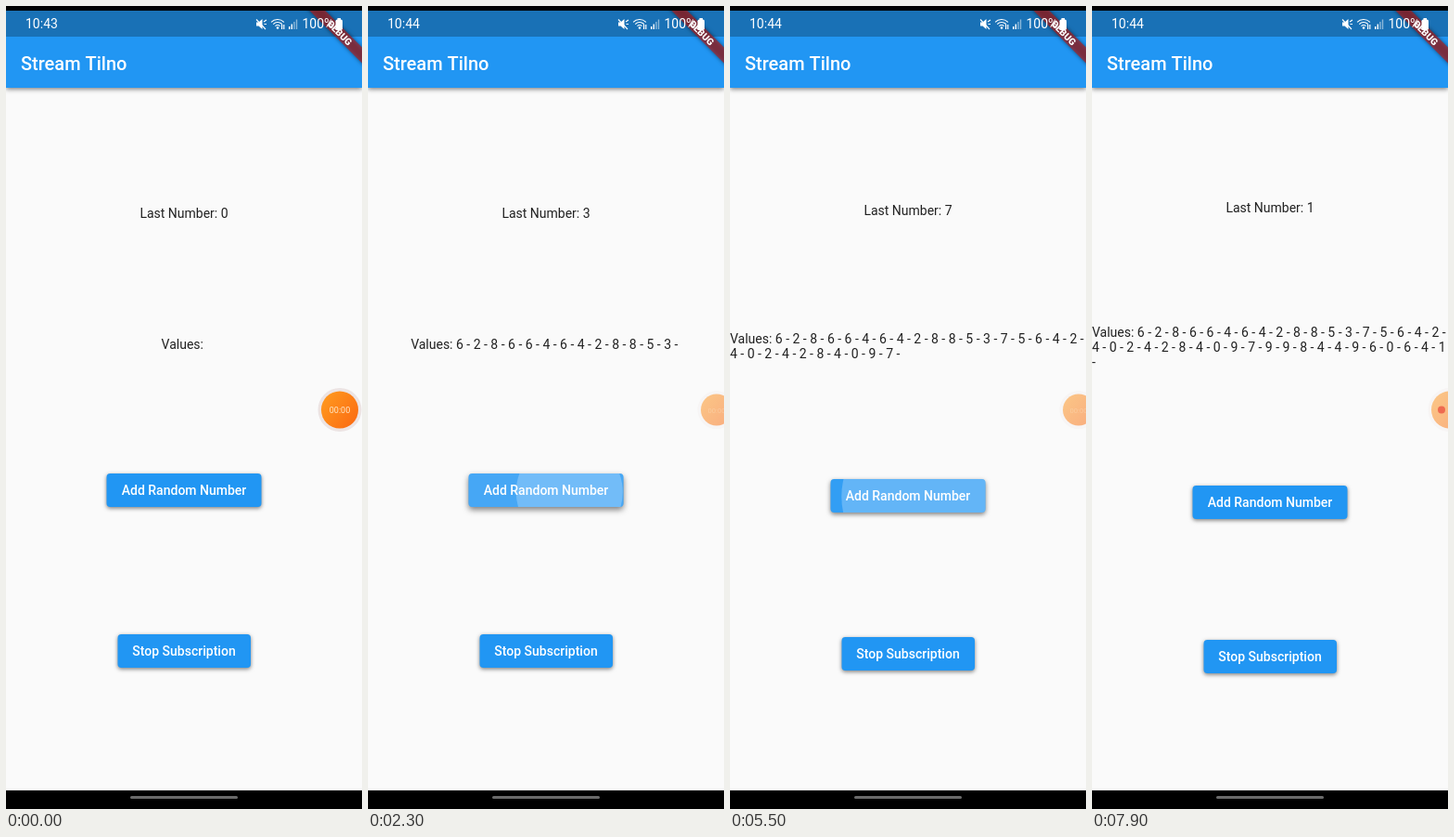
Animation, 384 px wide and 864 px high, one loop 8000 ms. Source, as an HTML page with a canvas:

```html
<!DOCTYPE html>
<html lang="en">
<head>
<meta charset="utf-8">
<title>Stream Tilno</title>
<style>
  html, body { margin: 0; width: 100%; height: 100%; overflow: hidden; background: #fafafa; }
  canvas { display: block; width: 384px; height: 864px; }
</style>
</head>
<body>
<canvas id="stage"></canvas>
<script>
const W = 384, H = 864, LOOP = 8000, STEP = 100;
const BLUE = '#2196f3', INK = '#212121';
const FONT = 'Roboto, "Liberation Sans", sans-serif';

const VALUES = '628664642885375642402428409799844960641';
// [count, time in ms]; taps between these are evenly spaced
const TAPS = [[1, 80], [6, 810], [13, 2220], [18, 3250], [23, 4380], [34, 6450], [39, 7440]];

const canvas = document.getElementById('stage');
const ctx = canvas.getContext('2d');
const dpr = window.devicePixelRatio || 1;
canvas.width = W * dpr;
canvas.height = H * dpr;

const clamp = (v, a = 0, b = 1) => Math.min(b, Math.max(a, v));
const lerp = (a, b, p) => a + (b - a) * p;
const smooth = (t, from, to) => {
  const p = clamp((t - from) / (to - from));
  return p * p * (3 - 2 * p);
};

const tapTimes = [];
TAPS.slice(1).forEach(([n1, t1], i) => {
  const [n0, t0] = TAPS[i];
  for (let n = n0; n < n1; n++) tapTimes.push(lerp(t0, t1, (n - n0) / (n1 - n0)));
});
tapTimes.push(TAPS[TAPS.length - 1][1]);

function rect(x, y, w, h, color) {
  ctx.fillStyle = color;
  ctx.fillRect(x, y, w, h);
}

function round(x, y, w, h, r) {
  ctx.beginPath();
  ctx.roundRect(x, y, w, h, r);
}

function disc(x, y, r, color) {
  ctx.fillStyle = color;
  ctx.beginPath();
  ctx.arc(x, y, r, 0, Math.PI * 2);
  ctx.fill();
}

function text(str, x, y, { size = 14, weight = 400, color = '#fff', align = 'left' } = {}) {
  ctx.font = `${weight} ${size}px ${FONT}`;
  ctx.fillStyle = color;
  ctx.textAlign = align;
  ctx.fillText(str, x, y);
}

function shadow(color, blur, dy) {
  ctx.shadowColor = color;
  ctx.shadowBlur = blur * dpr;
  ctx.shadowOffsetY = dy * dpr;
}

function wrap(str) {
  ctx.font = `400 14px ${FONT}`;
  const lines = [];
  let line = '';
  for (const word of str.trim().split(' ')) {
    const next = line ? line + ' ' + word : word;
    if (line && ctx.measureText(next).width > W) {
      lines.push(line);
      line = word;
    } else line = next;
  }
  return [...lines, line];
}

function drawBar() {
  ctx.save();
  shadow('rgba(0,0,0,.5)', 5, 1.5);
  rect(0, 5, W, 83, BLUE);
  ctx.restore();
  rect(0, 5, W, 28, 'rgba(0,0,0,.25)');
  text('Stream Tilno', 16, 69, { size: 20, weight: 500 });
}

function drawBanner() {
  ctx.save();
  ctx.beginPath();
  ctx.rect(0, 5, W, H);
  ctx.clip();
  ctx.translate(W, 5);
  ctx.rotate(Math.PI / 4);
  ctx.filter = `blur(${2 * dpr}px)`;
  rect(-50, 28, 100, 12, 'rgba(0,0,0,.5)');
  ctx.filter = 'none';
  rect(-50, 28, 100, 12, 'rgba(183,28,28,.63)');
  text('DEBUG', 0, 37.6, { size: 10.2, weight: 900, align: 'center' });
  ctx.restore();
}

function drawStatus(clock, alpha) {
  ctx.save();
  ctx.globalAlpha = alpha;
  text(clock, 21, 24);
  text('100%', 319.5, 24);
  ctx.fillStyle = ctx.strokeStyle = '#fff';

  // muted speaker
  ctx.beginPath();
  ctx.moveTo(270, 17.5);
  ctx.lineTo(272.5, 17.5);
  ctx.lineTo(276.5, 14);
  ctx.lineTo(276.5, 25);
  ctx.lineTo(272.5, 21.5);
  ctx.lineTo(270, 21.5);
  ctx.fill();
  ctx.lineWidth = 1.1;
  ctx.beginPath();
  ctx.moveTo(270, 14.5);
  ctx.lineTo(280, 25);
  ctx.moveTo(278, 17);
  ctx.lineTo(281, 15);
  ctx.moveTo(278.5, 19.5);
  ctx.lineTo(281, 19.5);
  ctx.stroke();

  // wireless arcs
  for (const r of [3.5, 6.5, 9.5]) {
    ctx.beginPath();
    ctx.arc(293, 24, r, -Math.PI * 0.76, -Math.PI * 0.24);
    ctx.stroke();
  }
  disc(293, 23.5, 1.3, '#fff');
  rect(297, 20, 1.2, 5, '#fff');
  rect(299.2, 20, 1.2, 5, '#fff');

  for (let i = 0; i < 4; i++) {
    const h = 3 + i * 2.5;
    rect(305 + i * 2.6, 25 - h, 1.4, h, i < 2 ? '#fff' : 'rgba(255,255,255,.5)');
  }

  ctx.fillStyle = '#fff';
  round(355.5, 14.5, 7.5, 11.5, 1.8);
  ctx.fill();
  rect(357.5, 13, 3.5, 2, '#fff');
  ctx.restore();
}

function drawMic(size) {
  if (size <= 0) return;
  ctx.save();
  ctx.translate(358, 19);
  ctx.scale(size, size);
  disc(0, 0, 9.8, '#43a854');
  ctx.fillStyle = ctx.strokeStyle = '#e6f6e6';
  round(-2, -6, 4, 7.5, 2);
  ctx.fill();
  ctx.lineWidth = 1.2;
  ctx.beginPath();
  ctx.arc(0, -0.5, 4, 0, Math.PI);
  ctx.moveTo(0, 3.5);
  ctx.lineTo(0, 6);
  ctx.stroke();
  ctx.restore();
}

function drawButton(label, x, y, w, since = 1e6) {
  const press = clamp(1 - since / 260);
  ctx.save();
  shadow('rgba(0,0,0,.5)', 4 + 4 * press, 1.5 + 2 * press);
  ctx.fillStyle = BLUE;
  round(x, y, w, 36, 4);
  ctx.fill();
  ctx.restore();

  const alpha = 0.24 * clamp(1 - (since - 225) / 200);
  if (alpha > 0) {
    const p = clamp(0.2 + 0.8 * since / 225);
    ctx.save();
    round(x, y, w, 36, 4);
    ctx.clip();
    rect(x, y, w, 36, `rgba(255,255,255,${0.24 * press})`);
    disc(lerp(241, 192, p), y + lerp(22, 18, p), lerp(27, 90, p), `rgba(255,255,255,${alpha})`);
    ctx.restore();
  }
  text(label, W / 2, y + 23, { weight: 500, align: 'center' });
}

function drawRecorder(t) {
  const tuck = smooth(t, 1500, 1900);
  const dot = smooth(t, 5800, 6200);
  const x = lerp(lerp(360, 376, tuck), 386, dot);
  const r = lerp(lerp(20, 17, tuck), 20, dot);
  ctx.save();
  disc(x, 434.5, r + 3.5, `rgba(215,195,195,${lerp(0.42, 0.1, tuck)})`);
  ctx.globalAlpha = lerp(1, 0.52, tuck);
  const fill = ctx.createLinearGradient(x - r, 420, x + r, 450);
  fill.addColorStop(0, '#ff9a1f');
  fill.addColorStop(1, '#fb6a12');
  disc(x, 434.5, r, fill);
  if (dot < 1) {
    ctx.globalAlpha *= (1 - dot) * lerp(0.9, 0.6, tuck);
    text('00:00', x, 437.8, { size: lerp(9, 7.6, tuck), color: '#fff3dc', align: 'center' });
  }
  if (dot > 0) {
    ctx.globalAlpha = dot;
    disc(377, 434.5, 4, '#ee6a50');
  }
  ctx.restore();
}

function draw(t) {
  ctx.setTransform(dpr, 0, 0, dpr, 0, 0);
  rect(0, 0, W, H, '#000');
  rect(0, 5, W, 839, '#fafafa');

  const count = tapTimes.filter(tap => tap <= t).length;
  const since = count ? t - tapTimes[count - 1] : 1e6;
  const str = 'Values: ' + [...VALUES.slice(0, count)].map(v => v + ' - ').join('');
  const lines = wrap(str);
  // each extra line takes a fifth of its height from every gap
  const gap = (lines.length - 1) * 3.2;

  const last = count ? VALUES[count - 1] : '0';
  text('Last Number: ' + last, W / 2, Math.round(228 - gap), { color: INK, align: 'center' });

  const left = Math.max(0, (W - ctx.measureText(str).width) / 2);
  const top = Math.round(369 - gap * 2);
  lines.forEach((line, i) => text(line, left, top + i * 16, { color: INK }));

  drawButton('Add Random Number', 108.5, Math.round(503 + gap * 2), 167, since);
  drawButton('Stop Subscription', 120.5, Math.round(676 + gap), 143.5);

  drawBar();
  drawBanner();
  const away = t >= 400 && t < 1500;
  if (!away) drawStatus(t < 1000 ? '10:43' : '10:44', t < 1000 ? 1 : smooth(t, 1400, 1700));
  drawMic(smooth(t, 300, 600) * (1 - smooth(t, 1300, 1600)));
  drawRecorder(t);

  ctx.fillStyle = '#6a6a6a';
  round(134, 850, 116, 3, 1.5);
  ctx.fill();
}

const start = performance.now();
function tick() {
  const t = (performance.now() - start) % LOOP;
  draw(Math.floor(t / STEP) * STEP);
  requestAnimationFrame(tick);
}
tick();
</script>
</body>
</html>
```
